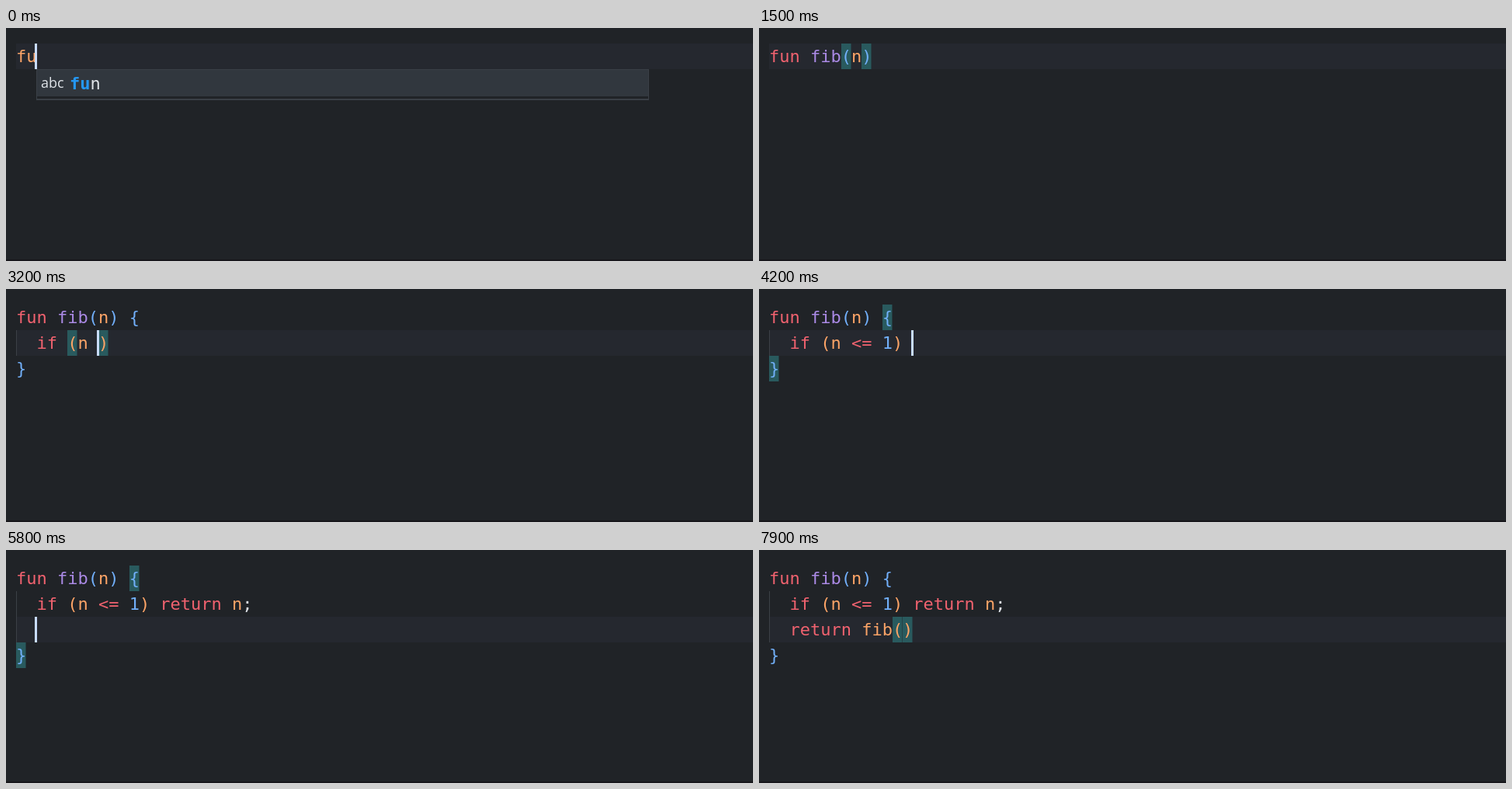
An HTML page with a canvas for the animation above (8 s loop, 962 px wide and 300 px high).

```html
<!DOCTYPE html>
<html lang="en">
<head>
<meta charset="utf-8">
<title>Typing a recursive function</title>
<style>
  html, body { margin: 0; width: 100%; height: 100%; overflow: hidden; background: #202327; }
  canvas { display: block; }
</style>
</head>
<body>
<canvas id="stage" width="962" height="300"></canvas>
<script>
const ctx = document.getElementById('stage').getContext('2d');
const LOOP = 8000, BLINK = 500;
const LEFT = 13, TOP = 20, ROW = 33, CELL = 13.24;
const MONO = '22px "DejaVu Sans Mono", monospace';
const COLORS = {
  back: '#202327', line: '#25282f', guide: '#3b4046', match: '#295a5e', caret: '#c8dcff',
  keyword: '#f0626f', title: '#ab8ae6', name: '#fca467', number: '#72b0fb', plain: '#dfe3e8',
  brackets: ['#72b0fb', '#fca467'],
  popup: '#202327', chosen: '#31373e', border: '#3a3f46', hit: '#2497f3',
};

// Key presses: [time, character].
const keys = [[0, 'f'], [0, 'u']];
const type = (text, start, step = 100) =>
  [...text].forEach((ch, i) => keys.push([start + i * step, ch]));
type('n fib', 100);
type('(n)', 800);
type(' {', 1600);
type('\n', 2000);
type('if', 2500);
type(' ', 2800);
type('(n <', 3000);
type('=', 3600);
type(' ', 3700);
type('1', 3900);
type(')', 4100);
type(' return', 4200);
type(' ', 5000);
type('n', 5200);
type(';\n', 5400);
type('retur', 6100);
type('n ', 6700);
type('fib', 7000);
type('(', 7400);

// Suggestion boxes: they stay where they opened.
const popups = [
  { from: 0, to: 200, row: 0, col: 2, words: ['fun'] },
  { from: 600, to: 800, row: 0, col: 7, words: ['fib', 'fibo', 'fibs'] },
  { from: 900, to: 1000, row: 0, col: 9, words: ['n'] },
  { from: 2700, to: 2800, row: 1, col: 4, words: ['if'] },
  { from: 4800, to: 5000, row: 1, col: 20, words: ['return'] },
  { from: 5300, to: 5400, row: 1, col: 22, words: ['n'] },
  { from: 6600, to: 6800, row: 2, col: 7, words: ['return'] },
  { from: 7300, to: 7400, row: 2, col: 12, words: ['fib'] },
];

const xOf = col => LEFT + col * CELL;
const yOf = row => TOP + row * ROW;

function box(color, x, y, w, h) {
  ctx.fillStyle = color;
  ctx.fillRect(x, y, w, h);
}

function write(text, x, y, color, font = MONO) {
  ctx.font = font;
  ctx.fillStyle = color;
  ctx.fillText(text, x, y);
}

// Replays the keys with auto-closing brackets and auto-indent.
function editorAt(time) {
  let before = '', after = '', last = 0;
  for (const [at, ch] of keys) {
    if (at > time) break;
    last = at;
    if (ch === '(') { before += ch; after = ')' + after; }
    else if (ch === '{') { before += ch; after = '}' + after; }
    else if (ch === ')' && after[0] === ch) { before += ch; after = after.slice(1); }
    else if (ch === '\n') {
      before += '\n  ';
      if (after[0] === '}') after = '\n' + after;
    } else before += ch;
  }
  const head = before.split('\n');
  return {
    text: before + after, offset: before.length, last,
    row: head.length - 1, col: head[head.length - 1].length,
    word: before.match(/\w*$/)[0],
  };
}

function bracketPairs(text) {
  const open = [], pairs = [];
  [...text].forEach((ch, i) => {
    if ('({'.includes(ch)) open.push(i);
    if (')}'.includes(ch)) pairs.push({ start: open.pop(), end: i, depth: open.length });
  });
  return pairs;
}

function place(text, index) {
  const lines = text.slice(0, index).split('\n');
  return { row: lines.length - 1, col: lines[lines.length - 1].length };
}

function tokenColor(token, before, depth) {
  if (/^(fun|if|return|[<=]+)$/.test(token)) return COLORS.keyword;
  if (/^[(){}]$/.test(token)) return COLORS.brackets[depth];
  if (/^\d/.test(token)) return COLORS.number;
  if (/^\w/.test(token)) return /fun $/.test(before) ? COLORS.title : COLORS.name;
  return COLORS.plain;
}

function drawCode(editor) {
  const { text, offset, row } = editor;
  const pairs = bracketPairs(text);
  box(COLORS.line, LEFT, yOf(row), 962 - LEFT, ROW);
  if (row > 0) box(COLORS.guide, LEFT, yOf(1), 1, row * ROW);

  const active = pairs.find(p => p.end + 1 === offset) ||
    pairs.find(p => p.start < offset && p.end >= offset);
  if (active) for (const index of [active.start, active.end]) {
    const at = place(text, index);
    box(COLORS.match, Math.round(xOf(at.col)), yOf(at.row), 12.5, ROW);
  }

  for (const found of text.matchAll(/\w+|[<=]+|[^\s\w]/g)) {
    const at = place(text, found.index);
    const pair = pairs.find(p => p.start === found.index || p.end === found.index);
    const color = tokenColor(found[0], text.slice(0, found.index), pair ? pair.depth : 0);
    write(found[0], xOf(at.col), yOf(at.row) + 24, color);
  }
}

function drawPopup({ row, col, words }, typed) {
  const x = Math.round(xOf(col)), y = yOf(row + 1);
  const width = 789, height = 7 + words.length * ROW;
  box(COLORS.border, x, y, width, height);
  box(COLORS.popup, x + 1, y + 1, width - 2, height - 3);
  box(COLORS.chosen, x + 1, y + 1, width - 2, 34);
  words.forEach((word, i) => {
    const base = y + 26 + i * ROW;
    write('abc', x + 6, base - 2, COLORS.plain, '18px "Open Sans", sans-serif');
    write(typed, x + 43, base, COLORS.hit, 'bold ' + MONO);
    write(word.slice(typed.length), x + 43 + typed.length * CELL, base, COLORS.plain);
  });
}

function draw(time) {
  const editor = editorAt(time);
  box(COLORS.back, 0, 0, 962, 300);
  box('#17161b', 0, 298, 962, 2);
  drawCode(editor);
  const popup = popups.find(p => time >= p.from && time < p.to);
  if (popup) drawPopup(popup, editor.word);
  if (Math.floor((time - editor.last) / BLINK) % 2 === 0) {
    box(COLORS.caret, Math.round(xOf(editor.col)) - 2, yOf(editor.row), 3, ROW);
  }
}

const start = performance.now();
function tick() {
  draw((performance.now() - start) % LOOP);
  requestAnimationFrame(tick);
}
tick();
</script>
</body>
</html>
```
